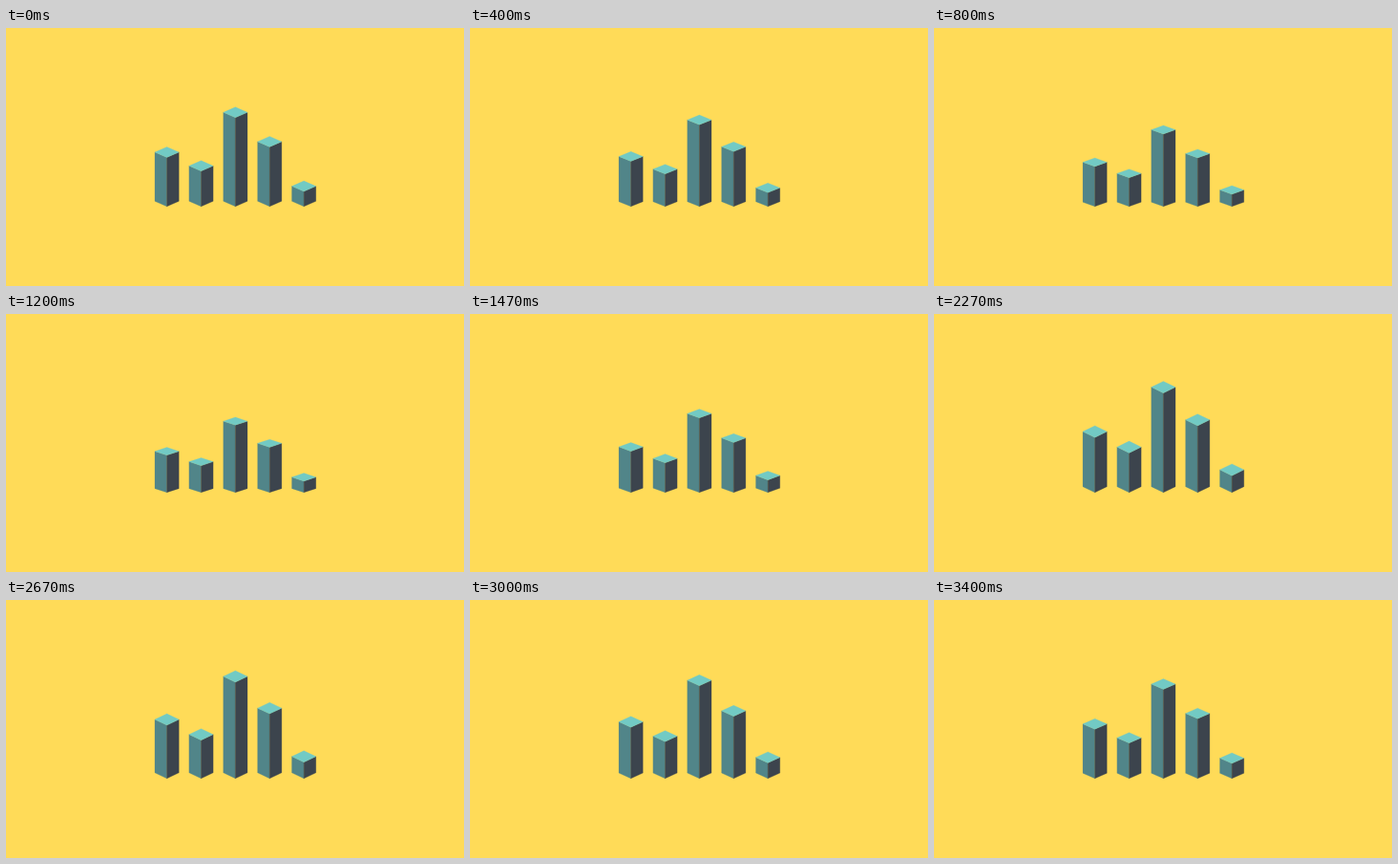
Animation of 480 by 270 pixels, one loop 3470 ms. Source, as an HTML page:

```html
<!DOCTYPE html>
<html lang="en">
<head>
<meta charset="utf-8">
<title>Isometric bars</title>
<style>
  html, body { margin: 0; width: 100%; height: 100%; overflow: hidden; background: #ffdb58; }
  svg { display: block; width: 480px; height: 270px; }
  path { stroke-width: .3; }
  .left { fill: #518589; stroke: #518589; }
  .right { fill: #3c444d; stroke: #3c444d; }
  .top { fill: #72cac4; stroke: #72cac4; }
</style>
</head>
<body>
<svg viewBox="0 0 480 270"><g id="bars"></g></svg>
<script>
  const LOOP = 3470, BASE = 186.8, HALF = 12.6, RISE = 5.5;
  const heights = [62.4, 48, 104, 73.4, 26.7];
  const bars = document.getElementById('bars');

  // Each bar stands on y = 0, so scaling the group squashes it onto the floor.
  bars.innerHTML = heights.map((h, i) => {
    const x = 168.6 + i * 35.9, l = x - HALF, r = x + HALF;
    const front = 2 * RISE - h, side = RISE - h;
    return `<path class="left" d="M${l} ${side}L${x} ${front}V0L${l} ${-RISE}Z"/>` +
      `<path class="right" d="M${r} ${side}L${x} ${front}V0L${r} ${-RISE}Z"/>` +
      `<path class="top" d="M${l} ${side}L${x} ${-h}L${r} ${side}L${x} ${front}Z"/>`;
  }).join('');

  // [time in ms, height of the tallest bar]
  const keys = [
    [0, 104], [530, 92.3], [800, 84.8], [1110, 78.1], [1200, 78.8],
    [1600, 92.4], [1730, 97.6], [2130, 112.2], [2270, 116.4],
    [2370, 118], [2670, 112.8], [3200, 106.2], [3400, 104.3]
  ];
  const count = keys.length;

  function key(i) {
    const turn = Math.floor(i / count), [t, v] = keys[i - turn * count];
    return [t + turn * LOOP, v];
  }

  function slope(i) {
    const [t0, v0] = key(i), [t1, v1] = key(i + 1);
    return (v1 - v0) / (t1 - t0);
  }

  // Harmonic mean keeps the curve free of overshoot and flat at its extremes.
  function tangent(i) {
    const a = slope(i - 1), b = slope(i);
    return a * b <= 0 ? 0 : 2 * a * b / (a + b);
  }

  function heightAt(t) {
    let i = count - 1;
    while (keys[i][0] > t) i--;
    const [t0, v0] = key(i), [t1, v1] = key(i + 1);
    const d = t1 - t0, u = (t - t0) / d, w = 1 - u;
    return w * w * ((1 + 2 * u) * v0 + u * d * tangent(i)) +
      u * u * ((1 + 2 * w) * v1 - w * d * tangent(i + 1));
  }

  // Poses advance 15 times a second, on 10 ms ticks.
  function stepTime(t) {
    const n = Math.floor((Math.floor(t / 10) + .5) * 3 / 20);
    return Math.round(n * 20 / 3) * 10;
  }

  function draw(now) {
    const scale = heightAt(stepTime(now % LOOP)) / 104;
    bars.setAttribute('transform', `translate(0 ${BASE}) scale(1 ${scale.toFixed(4)})`);
  }

  const start = performance.now();
  function tick() {
    draw(performance.now() - start);
    requestAnimationFrame(tick);
  }
  tick();
</script>
</body>
</html>
```
